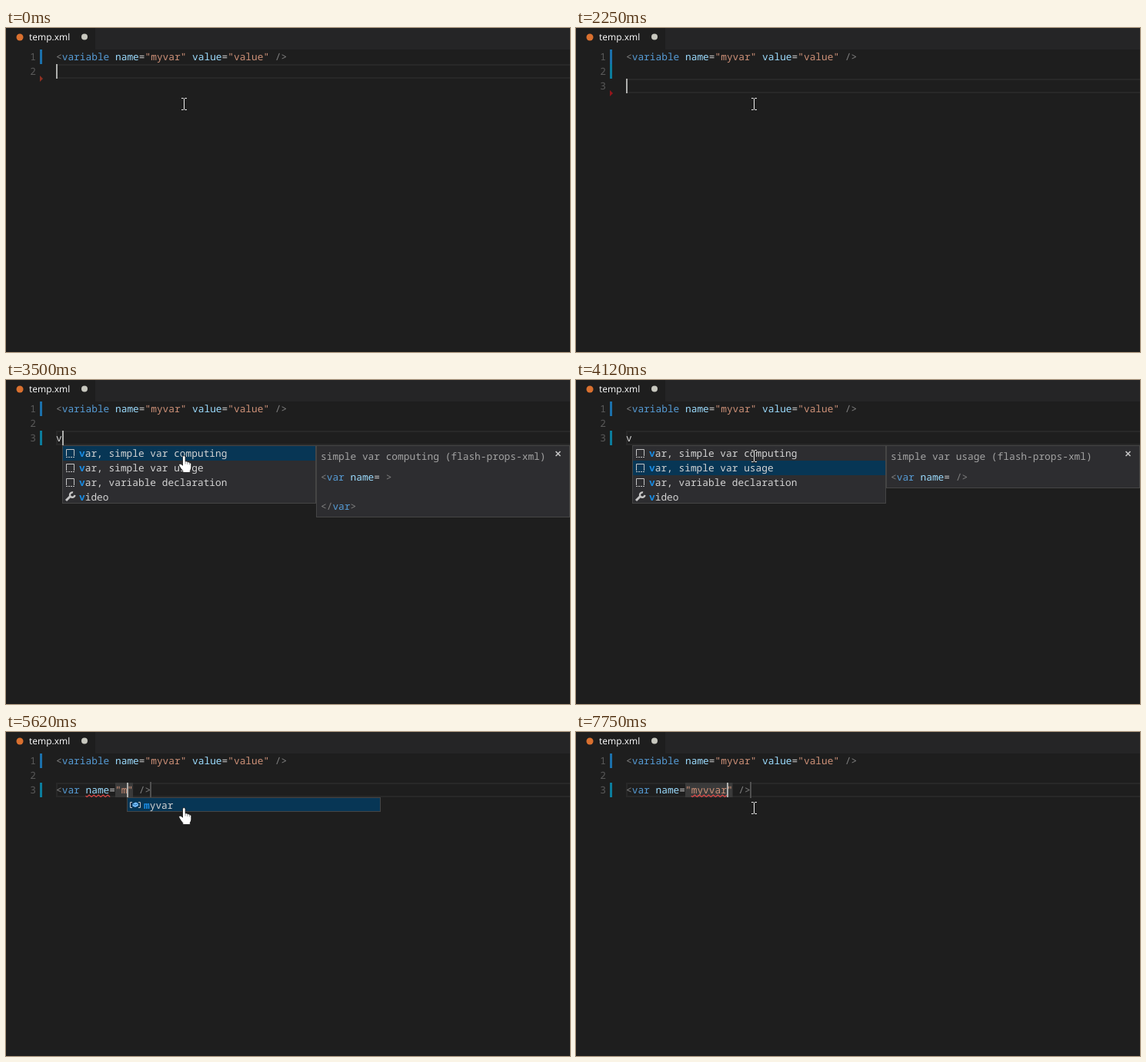
Recreate the animation shown at these times as an HTML page. Size 733 px wide and 422 px high, loop 8000 ms.

```html
<!DOCTYPE html>
<html lang="en">
<head>
<meta charset="utf-8">
<title>Editor completion</title>
<style>
  html, body { margin: 0; width: 100%; height: 100%; overflow: hidden; background: #1e1e1e; }
  svg { display: block; width: 733px; height: 422px; }
  text {
    font: 12.83px "Noto Sans Mono", "DejaVu Sans Mono", monospace;
    fill: #d4d4d4; white-space: pre; text-rendering: geometricPrecision;
  }
  .tab { font: 12px "Open Sans", "Noto Sans", sans-serif; fill: #fff; }
  .num { fill: #5a5a5a; text-anchor: end; }
  .punct { fill: #808080; }
  .tag { fill: #569cd6; }
  .attr { fill: #9cdcfe; }
  .str { fill: #ce9178; }
  .hit { fill: #1a8ae0; font-weight: bold; }
  .dim { fill: #a4a4a4; }
</style>
</head>
<body>
<svg viewBox="0 0 733 422">
  <rect width="733" height="422" fill="#1e1e1e"/>
  <rect x="116" width="617" height="28" fill="#252526"/>
  <circle cx="18" cy="12" r="4.5" fill="#d9702f"/>
  <text class="tab" x="30" y="16">temp.xml</text>
  <circle cx="102" cy="11.5" r="4" fill="#c8c8bf"/>
  <g id="scene"></g>
</svg>
<script>
const LOOP = 8000, LEFT = 65, CHAR = 7.697, LINE = 19;
const scene = document.getElementById('scene');

// Latest value whose start time has been reached.
const at = (t, keys) => keys.reduce((v, [time, next]) => t >= time ? next : v, null);
const colX = col => LEFT + col * CHAR;
const lineY = n => 28 + (n - 1) * LINE;
const esc = s => s.replace(/&/g, '&amp;').replace(/</g, '&lt;').replace(/>/g, '&gt;');
const span = (cls, s) => `<tspan class="${cls}">${esc(s)}</tspan>`;
const text = (x, y, body, cls = '') => `<text class="${cls}" x="${x}" y="${y}">${body}</text>`;
const rect = (x, y, w, h, fill) => `<rect x="${x}" y="${y}" width="${w}" height="${h}" fill="${fill}"/>`;
const panel = (x, y, w, h) =>
  `<rect x="${x + .5}" y="${y + .5}" width="${w - 1}" height="${h - 1}" fill="#2d2d30" stroke="#454545"/>`;
const stroke = (d, color, width = 1) =>
  `<path d="${d}" fill="none" stroke="${color}" stroke-width="${width}"/>`;

function xml(src) {
  return src.replace(/(<\/?|\/?>)|("[^"]*")|(\w+(?==))|(\w+)|[^]/g, (m, punct, str, attr, tag) =>
    punct ? span('punct', m) : str ? span('str', m) : attr ? span('attr', m) : tag ? span('tag', m) : esc(m));
}

const icons = {
  snippet: (x, y) => stroke(`M${x + 5.5} ${y + 14}V${y + 5.5}h10V${y + 14}`, '#c5c5c5') +
    `<path d="M${x + 5} ${y + 15.5}h11" stroke="#c5c5c5" stroke-dasharray="2 1"/>`,
  wrench: (x, y) => stroke(`M${x + 5} ${y + 15}l6-6`, '#c5c5c5', 3) +
    stroke(`M${x + 14} ${y + 4.5}a3.2 3.2 0 1 0 2.4 3.3`, '#c5c5c5', 2.4),
  value: (x, y) => stroke(`M${x + 7} ${y + 6.5}h-2.5v7H${x + 7}M${x + 15} ${y + 6.5}h2.5v7H${x + 15}`, '#c5c5c5') +
    `<path d="M${x + 7.5} ${y + 8.5}l4-2 3.5 1.5v3l-4 2-3.500-1.500z" fill="#75beff"/>` +
    stroke(`M${x + 8} ${y + 9}l3 1.200 3.500-1.700`, '#1b5c8e', .8)
};

function list(x, rows, picked, hits) {
  const top = 85, height = Math.max(19, rows.length * LINE);
  let out = panel(x, top, 330, height);
  rows.forEach(([icon, label], i) => {
    const y = top + i * LINE;
    if (i === picked) out += rect(x + 1, y + 1, 328, rows.length > 1 ? LINE : 17, '#073655');
    out += icons[icon](x, y) +
      text(x + 22, y + 15, span('hit', label.slice(0, hits)) + esc(label.slice(hits)));
  });
  return out;
}

function details(title, lines, height) {
  return panel(403, 85, 330, height) +
    text(409, 104, title + ' (flash-props-xml)', 'dim') +
    stroke('M714.500 93l6 6m0-6l-6 6', '#c5c5c5', 1.6) +
    lines.map((s, i) => text(409, 131 + i * LINE, xml(s))).join('');
}

function squiggle(from, to) {
  const x1 = colX(from), x2 = colX(to);
  let d = `M${x1} 83.300l1.700 1.200`;
  for (let x = x1 + 1.7, up = true; x < x2 - 2; x += 3, up = !up) d += `l3 ${up ? -2.5 : 2.5}`;
  return stroke(d, '#e04848', 1.1);
}

const ibeam = () =>
  stroke('M228 91.500h2.500l1 1 1-1h2.500M231.500 92v14M228 106.500h2.500l1-1 1 1h2.500', '#1e1e1e', 2.6) +
  stroke('M228 91.500h2.500l1 1 1-1h2.500M231.500 92v14M228 106.500h2.500l1-1 1 1h2.500', '#f0f0f0');

const hand = () => `<path d="M229.500 100.500q0-2 1.800-2t1.800 2v5.500q2.400-.8 2.800.8 2.200-.6 2.600 1
  2.300-.3 2.300 1.700v4.500q0 2-1.500 4v2.500h-9.500v-2q-2.300-2.600-4.600-6.500-1.200-2.200.4-2.800 1.700-.5 3.900 2z"
  fill="#fff" stroke="#111" stroke-width=".8"/>` +
  stroke('M233.100 106v3.500M235.900 107v3M238.500 108v2.500', '#555', .6);

function gutter(t) {
  const blue = '#1b70ab', teal = '#0c7d9d';
  const arrow = (y, fill) => `<path d="M44 ${y - 4}l4 4-4 4z" fill="${fill}"/>`;
  let out = rect(44, 28, 3, LINE, blue);
  if (t < 2250) out += arrow(66, '#8f3022');
  if (t >= 2110 && t < 2740) out += arrow(85, '#94151b');
  if (t >= 2250 && t < 2740) out += rect(44, 47, 3, LINE, teal);
  if (t >= 2740) out += rect(44, 66, 3, LINE, teal);
  const count = t < 2110 ? 2 : 3;
  for (let n = 1; n <= count; n++) out += text(39, lineY(n) + 14, n, 'num');
  return out;
}

function picture(t) {
  const active = t < 2110 ? 2 : 3, y = lineY(active);
  const value = at(t, [[4240, ''], [5000, '""'], [5510, '"m"'], [5870, '"my"'], [6400, '"myv"'],
    [6620, '"myvv"'], [7390, '"myvva"'], [7750, '"myvvar"']]);
  const typed = value ? value.slice(1, -1) : '';
  const caretOn = at(t, [[0, 1], [240, 0], [740, 1], [1240, 0], [1750, 1], [2990, 0], [3500, 1],
    [3880, 0], [4240, 1], [4630, 0], [5000, 1], [7140, 0], [7390, 1]]);
  const wave = at(t, [[5620, [5, 9]], [6000, [11, 13]], [6500, [11, 14]], [6750, [11, 15]],
    [7520, [11, 16]], [7750, [11, 17]]]);
  const pointing = at(t, [[2610, true], [4120, false], [5120, true], [6750, false]]);
  let col = 0;

  let out = `<rect x="66" y="${y + 1}" width="680" height="17" fill="none" stroke="#282828" stroke-width="2"/>`;
  out += gutter(t) + text(LEFT, 42, xml('<variable name="myvar" value="value" />'));

  if (value !== null) {
    const line = `<var name=${value} />`;
    col = 10 + (value ? typed.length + 1 : 0);
    if (value) out += rect(142, 66, value.length * CHAR, LINE, '#3a3a3a');
    out += rect(Math.round(colX(line.length)) - 1, 65, 2, 21, '#505050');
    out += text(LEFT, 80, xml(line));
    if (wave) out += squiggle(...wave);
  } else if (t >= 2610) {
    col = 1;
    out += text(LEFT, 80, 'v');
  }

  const caretX = Math.round(colX(col));
  if (caretOn) out += rect(caretX, y, 2, LINE, '#aeafad');

  if (t >= 2610 && t < 4240) {
    const second = t >= 3740;
    out += list(73, [['snippet', 'var, simple var computing'], ['snippet', 'var, simple var usage'],
      ['snippet', 'var, variable declaration'], ['wrench', 'video']], second ? 1 : 0, 1);
    out += second ? details('simple var usage', ['<var name= />'], 56)
      : details('simple var computing', ['<var name= >', '', '</var>'], 94);
  }
  if (t >= 5000 && t < 6620) out += list(caretX, [['value', 'myvar']], 0, typed.length);

  return out + (pointing ? hand() : ibeam());
}

let shown = '';
function frame(now) {
  const next = picture(now % LOOP);
  if (next !== shown) scene.innerHTML = shown = next;
  requestAnimationFrame(frame);
}
frame(0);
</script>
</body>
</html>
```
